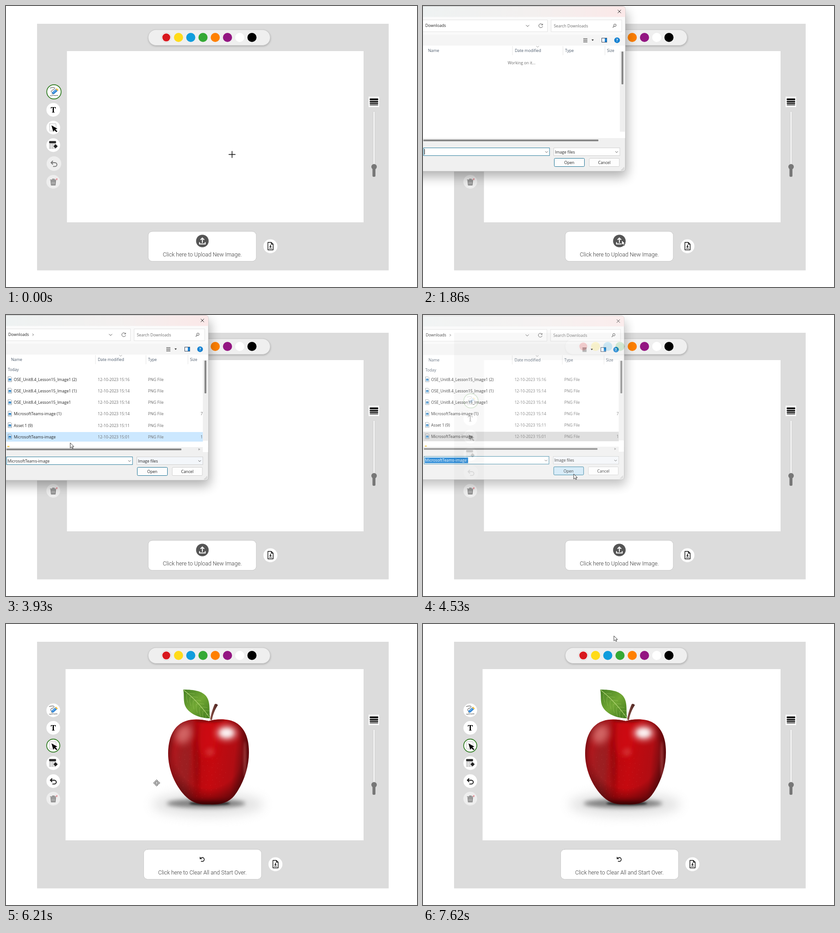
Recreate the animation shown at these times as an HTML page. Size 900 by 617 pixels, loop 7650 ms.

```html
<!DOCTYPE html>
<html lang="en">
<head>
<meta charset="utf-8">
<title>Image annotation board</title>
<style>
  html, body { margin: 0; width: 100%; height: 100%; overflow: hidden; background: #fff; }
  svg { display: block; width: 900px; height: 617px; }
  .ui { font: 8.7px "Open Sans", "Noto Sans", sans-serif; fill: #222; }
  .ui .dim { fill: #6d6d6d; }
  .ui .head { fill: #4c5a6b; }
  .label { font: 300 12.2px Roboto, sans-serif; fill: #333; text-anchor: middle; }
  .glyph { font: bold 17px "Noto Serif", "DejaVu Serif", serif; text-anchor: middle; }
</style>
</head>
<body>
<svg id="stage" viewBox="0 0 900 617" xmlns="http://www.w3.org/2000/svg"></svg>
<script>
const LOOP = 7650;
const svg = document.getElementById('stage');

const rect = (x, y, w, h, fill, more = '') =>
  `<rect x="${x}" y="${y}" width="${w}" height="${h}" fill="${fill}" ${more}/>`;
const disc = (x, y, r, fill, more = '') =>
  `<circle cx="${x}" cy="${y}" r="${r}" fill="${fill}" ${more}/>`;
const oval = (x, y, rx, ry, fill, more = '') =>
  `<ellipse cx="${x}" cy="${y}" rx="${rx}" ry="${ry}" fill="${fill}" ${more}/>`;
const line = (d, color = '#222', w = 1, more = '') =>
  `<path d="${d}" fill="none" stroke="${color}" stroke-width="${w}" ${more}/>`;
const shape = (d, fill, more = '') => `<path d="${d}" fill="${fill}" ${more}/>`;
const text = (x, y, s, cls = '', more = '') => `<text x="${x}" y="${y}" class="${cls}" ${more}>${s}</text>`;
const group = (id, body, more = '') => `<g id="${id}" ${more}>${body}</g>`;
const at = (x, y, body) => `<g transform="translate(${x} ${y})">${body}</g>`;
const gradient = (id, kind, attrs, stops) =>
  `<${kind}Gradient id="${id}" ${attrs}>` +
  stops.map(([o, c, a = 1]) => `<stop offset="${o}" stop-color="${c}" stop-opacity="${a}"/>`).join('') +
  `</${kind}Gradient>`;
const blur = (id, s) =>
  `<filter id="${id}" x="-60%" y="-60%" width="220%" height="220%"><feGaussianBlur stdDeviation="${s}"/></filter>`;

const APPLE = 'M444 213C461 208 488 207 504 217C523 229 532 250 532 282C532 317 519 352 500 377C487 393 468 397 444 396C421 397 405 391 391 376C370 353 355 320 355 284C355 248 369 221 394 213C411 207 430 210 444 213Z';
const LEAF = 'M388 144C405 144 427 145 438 158C449 172 444 190 447 207C426 207 404 199 394 183C387 171 391 157 388 144Z';
const ARROW = 'M0 0V11.2L2.7 8.8L4.6 12.4L6.3 11.6L4.6 8.1H8Z';

const defs = `<defs>
  ${blur('soft2', 2)}${blur('soft5', 5)}${blur('soft8', 8)}${blur('soft12', 12)}
  ${gradient('skin', 'linear', 'x1="0" x2="1" y1="0" y2=".12"',
    [[0, '#84141a'], [.1, '#b3181e'], [.3, '#a8171d'], [.36, '#b5090f'], [.6, '#c5090f'], [.86, '#b10d13'], [1, '#6d0c11']])}
  ${gradient('shade', 'radial', 'cx=".5" cy=".4" r=".62"', [[0, '#400', 0], [.66, '#400', 0], [1, '#2d0306', .68]])}
  ${gradient('leafFill', 'linear', 'x1="0" x2="1" y1="0" y2="1"', [[0, '#467f24'], [.5, '#72a834'], [1, '#3f781d']])}
  ${gradient('stemFill', 'linear', '', [[0, '#8c5248'], [1, '#4a2320']])}
  ${gradient('titleFill', 'linear', '', [[0, '#eef2f2'], [.55, '#f3f0ef'], [1, '#fbe8e8']])}
  <clipPath id="inApple"><path d="${APPLE}"/></clipPath>
  <clipPath id="inLeaf"><path d="${LEAF}"/></clipPath>
  <clipPath id="inList"><rect x="0" y="87" width="431" height="203"/></clipPath>
</defs>`;

function frameParts() {
  const colors = ['#d8171d', '#ffdb1a', '#109ddd', '#35a935', '#ff8000', '#931682', '#fff', '#000'];
  const swatches = colors.map((c, i) => disc(351 + i * 26.8, 69, i ? 10 : 8.7, c)).join('');
  const bars = [[203, 4], [208.5, 3], [212.8, 2.3], [216.4, 1.5]]
    .map(([y, h]) => rect(796.5, y, 18.5, h, '#000', 'rx=".8"')).join('');
  return rect(0, 0, 900, 617, '#fff') + rect(68, 39, 770, 541.5, '#dcdcdc') +
    rect(312, 54, 267, 34, '#777', 'rx="17" opacity=".55" filter="url(#soft2)"') +
    rect(311.5, 52, 267, 34.5, '#efefef', 'rx="17" stroke="#c9c9c9"') +
    disc(351, 69, 10.6, '#fff', 'stroke="#cfcfcf"') + swatches +
    rect(794, 199, 23, 23, '#fff') + bars +
    rect(803.5, 231, 5, 144, '#eee', 'rx="2.5" stroke="#cfcfcf"') +
    rect(802.5, 352, 6.5, 23, '#777', 'rx="2.5"') + disc(806, 353, 6, '#777');
}

const button = (x, y, body, r = 15, fill = '#fff') => at(x, y, disc(0, 0, r, fill) + body);
const ring = r => disc(0, 0, r, 'none', 'stroke="#2d7a1f" stroke-width="1.7"');

const penIcon =
  line('M-9-8C-5-10 2-10 2-8C2-5-6-4-6-1C-6 2-2 0-4 4', '#333', 1) +
  line('M-9 8C-6 10-2 7 1 8S5 7 9 8', '#444', 1) +
  shape('M-5 6L-4 1L4-6L8-2L0 5Z', '#2f83d3') + line('M-2 2L5-4', '#7fc0f5', 1.3) +
  shape('M4-6L6-8L10-4L8-2Z', '#f5bd3d') + shape('M-5 6L-4 3L-2 5Z', '#f1c58d');
const textIcon = text(0, 6, 'T', 'glyph');
const selectIcon = rect(-8, -8.5, 14, 16, 'none', 'stroke="#888" stroke-width=".9" stroke-dasharray="1.4 1"') +
  shape('M-4-5L9 2.5L4.3 3.8L9 8L7 10L2.4 5.5L0 9Z', '#000');
const tableIcon = rect(-9, -9, 15, 5, '#292929', 'rx="1"') + rect(-9, -3, 15, 11, '#c8c8c8', 'rx="1"') +
  line('M-9 .5H6M-9 4H6M-4-3V8M1-3V8', '#f3f3f3', 1) + shape('M5-2.5L10 2.5L5 7.5L0 2.5Z', '#222', 'stroke="#fff" stroke-width=".6"');
const undoIcon = c => line('M-6.2-2H2.3A4.2 4.2 0 0 1 2.3 6.4H-2M-2.3-6L-6.3-2L-2.3 2', c, 1.9);
const trashIcon = shape('M-6-3H6L5 8H-5Z', '#858585') + line('M-7-4.3H7M-2.5-6H3', '#858585', 1.6) +
  line('M-2.8-1V6M0-1V6M2.8-1V6', '#e3e3e3', 1) + line('M5.8-7.5L9.3-4M9.3-7.5L5.8-4', '#e68c94', 1.1);
const fileIcon = line('M-5.5-8.5H2L6-4.5V8H-5.5ZM2-8.5V-4.5H6', '#111', 1.4, 'stroke-linejoin="round"') +
  shape('M-.8-3H1V.5H3L.1 3.4L-2.8.5H-.8Z', '#222') + line('M-3 4.8H3.5', '#222', 1);

const toolbar = (pen, select, undo, trash) => pen +
  button(103.5, 228, textIcon) + select + button(103.5, 305.5, tableIcon) + undo + trash;

const dropZone = (x, w) =>
  rect(x + .5, 495, w, 65.5, '#fff', 'rx="9" stroke="#aaa" stroke-dasharray="1.5 1.5"');

function emptyBoard() {
  return rect(133.5, 99, 649.5, 376, '#fff') +
    toolbar(button(105, 188.5, penIcon + ring(15.7), 16), button(103.5, 267, selectIcon),
      button(105, 346, undoIcon('#777'), 16, '#eee'), button(103.5, 386, trashIcon, 15, '#eee')) +
    dropZone(311, 236.5) + disc(430, 516, 13.8, '#555') +
    line('M430 520V510M426 513.5L430 509.5L434 513.5M423.8 518.5V522.5H436.2V518.5', '#fff', 2) +
    text(430, 550, 'Click here to Upload New Image.', 'label') + button(579, 527.5, fileIcon, 15.3);
}

function apple() {
  let veins = '';
  for (let i = 1; i < 8; i++) {
    const x = 389 + i * 7, y = 146 + i * 7.5;
    veins += `M${x} ${y}q9-2 17 0M${x} ${y}q-2 10 2 19`;
  }
  let specks = '';
  for (let i = 0; i < 90; i++) {
    const a = i * 2.4, r = Math.sqrt(i / 90);
    specks += disc((423 + 58 * r * Math.cos(a)).toFixed(1), (328 + 55 * r * Math.sin(a)).toFixed(1), .5, '#e07b72', 'opacity=".38"');
  }
  return oval(442, 396, 122, 26, '#bbb', 'opacity=".42" filter="url(#soft12)"') +
    oval(438, 394, 86, 10, '#444', 'opacity=".6" filter="url(#soft5)"') +
    oval(446, 394, 45, 4, '#000', 'opacity=".75" filter="url(#soft2)"') +
    shape(APPLE, 'url(#skin)') +
    `<g clip-path="url(#inApple)">` +
      oval(392, 335, 21, 78, '#8f2528', 'opacity=".48" filter="url(#soft8)"') +
      oval(418, 295, 4, 78, '#68080d', 'opacity=".45" filter="url(#soft5)"') +
      oval(440, 250, 20, 46, '#d90c12', 'opacity=".5" filter="url(#soft8)"') +
      shape(APPLE, 'url(#shade)') + specks +
      oval(446, 212, 32, 4, '#6c0a0c', 'opacity=".7" filter="url(#soft2)"') +
      oval(389, 242, 17, 22, '#f0a49f', 'opacity=".55" filter="url(#soft8)" transform="rotate(28 389 242)"') +
      oval(483, 239, 21, 14, '#fff', 'opacity=".85" filter="url(#soft8)"') +
      oval(483, 239, 13, 8, '#fff', 'opacity=".75" filter="url(#soft5)"') +
      oval(447, 281, 10, 9, '#df6865', 'opacity=".35" filter="url(#soft5)"') +
      oval(523, 299, 3, 42, '#e9847e', 'opacity=".35" filter="url(#soft2)"') +
      oval(445, 397, 60, 8, '#220205', 'opacity=".65" filter="url(#soft5)"') +
    `</g>` +
    shape('M447 210C449 197 453 185 457 176Q461 174 464 178C457 189 453 199 451 211Z', 'url(#stemFill)') +
    shape(LEAF, 'url(#leafFill)') +
    `<g clip-path="url(#inLeaf)">` + line(veins, '#a4cd62', .7, 'opacity=".7"') + `</g>` +
    line('M389 145Q419 168 447 207', '#b5d878', 1.1);
}

function filledBoard() {
  return rect(130.5, 99, 652.5, 376, '#fff') + apple() +
    toolbar(button(103.5, 189.5, penIcon), button(103.5, 267, selectIcon + ring(14.4)),
      button(103.5, 345, undoIcon('#111')), button(103.5, 383.5, trashIcon, 15, '#eee')) +
    dropZone(301, 258) +
    line('M425.8 515A4.4 4.4 0 1 1 427 520.5M425 511.5V515.5H429', '#222', 1.6) +
    text(430, 550, 'Click here to Clear All and Start Over.', 'label') + button(590, 527.5, fileIcon, 15.3);
}

const files = [
  ['OSE_Unit8.4_Lesson15_Image1 (2)', '15:16'], ['OSE_Unit8.4_Lesson15_Image1 (1)', '15:14'],
  ['OSE_Unit8.4_Lesson15_Image1', '15:14'], ['MicrosoftTeams-image (1)', '15:14', '7'],
  ['Asset 1 (9)', '15:11'], ['MicrosoftTeams-image', '15:01', '1,1'],
];

function fileRow([name, time, size = ''], i) {
  const y = 141.5 + i * 25.2;
  return line(`M4.5 ${y - 6}h6l2 2v9h-8Z`, '#8a949c', .9) + rect(5.8, y - 2, 5.3, 5, '#2779bd') +
    shape(`M6 ${y + 2.5}l2-2.5 3 2.5Z`, '#8fd0f5') +
    text(17, y + 3.2, name) + text(201, y + 3.2, '12-10-2023 ' + time, 'dim') +
    text(311, y + 3.2, 'PNG File', 'dim') + text(426, y + 3.2, size, 'dim');
}

const chevron = (x, y, w = 3.5) => line(`M${x - w} ${y - w / 2}l${w} ${w}l${w}-${w}`, '#555', 1);

function dialog() {
  const headings = [[11, 'Name'], [201, 'Date modified'], [311, 'Type'], [403, 'Size']]
    .map(([x, s]) => text(x, 101, s, 'head')).join('');
  const shadow = rect(-40, 12, 487, 363, '#000', 'rx="8" opacity=".3" filter="url(#soft12)"');
  const chrome = rect(-20, .5, 463, 362.5, '#f0f0f0', 'rx="6" stroke="#b3b3b3" stroke-width=".8"') +
    shape('M0 1H437Q443 1 443 7V24H0Z', 'url(#titleFill)') +
    line('M426.5 8.5l7 7m0-7l-7 7', '#222', 1) +
    rect(0, 24, 442.6, 39, '#fafafa') + rect(0, 63, 442.6, 24, '#f5f5f5') +
    rect(-5, 30.5, 277.5, 26, '#fff', 'stroke="#e2e2e2"') + rect(280.5, 30.5, 154.5, 26, '#fff', 'stroke="#e2e2e2"') +
    text(5, 46.3, 'Downloads') + chevron(229, 43.5) +
    line('M261.5 41A4.3 4.3 0 1 0 262 44.5M262 39V41.7H259', '#555', 1) +
    text(286.5, 46.8, 'Search Downloads', 'dim') +
    disc(420.3, 42.3, 2.6, 'none', 'stroke="#444"') + line('M418.4 44.3L415.5 47.3', '#444', 1.1) +
    line('M351 71.5h9m-9 2.6h9m-9 2.6h9m-9 2.6h9', '#444', 1) + shape('M369 73.5h5l-2.5 3Z', '#222') +
    rect(391.5, 70.5, 11, 9, '#fff', 'stroke="#33455c"') + rect(398, 71, 4.5, 8, '#1a83d6') +
    disc(425, 75.2, 6.2, '#1582d2') + text(425, 78.4, '?', '', 'style="fill:#fff;text-anchor:middle;font-weight:bold"');
  const list = rect(0, 87, 442.6, 203, '#fff') + rect(431, 99, 11.5, 177, '#efefef') +
    rect(434.7, 100, 4, 72, '#858585', 'rx="1"') +
    line('M196 88V108M306.5 88V108M398.5 88V108', '#e5e5e5') + line('M248 88l3 2.5l3-2.5', '#888', .8) + headings +
    group('working', text(185.5, 128.3, 'Working on it...', 'dim')) +
    group('loaded',
      line('M58 41l2.3 2.3l-2.3 2.3', '#444', .9) + text(4, 123.3, 'Today', 'head') +
      group('row', rect(0, 257, 431, 21, '#cce8ff')) +
      `<g clip-path="url(#inList)">${files.map(fileRow).join('')}</g>` +
      rect(3, 287.5, 4.5, 2.5, '#f2c94c') + rect(431, 289, 11.5, 12, '#fff') + shape('M421.5 292.5v5l4-2.5Z', '#aaa'));
  const footer = rect(1, 293.2, 383, 3.8, '#858585', 'rx="1"') +
    rect(1.5, 311.5, 275.5, 17, '#fff', 'stroke="#2d7f9f"') +
    group('caret', line('M3.5 314V326', '#111')) +
    group('chosen', rect(3, 314, 95.5, 12.5, '#0a78d0', 'id="marked"') + text(3.5, 323.5, 'MicrosoftTeams-image', '', 'id="chosenName"')) +
    chevron(270.5, 320.5, 2.8) +
    rect(286.5, 311.5, 144.5, 17, '#fff', 'id="kind" stroke="#d0d0d0"') + text(289, 323.5, 'Image files') + chevron(424, 320.5, 2.8) +
    rect(287.5, 334.5, 66, 18, '#fdfdfd', 'id="open" rx="2" stroke="#1e7496"') +
    text(320.3, 347, 'Open', '', 'text-anchor="middle"') +
    rect(364, 334.5, 66, 18, '#fdfdfd', 'rx="2" stroke="#d0d0d0"') + text(397, 347, 'Cancel', '', 'text-anchor="middle"') +
    line('M434 361l7-7m-4 7l4-4', '#aaa', 1.2, 'stroke-dasharray="1.4 1"');
  return shadow + chrome + list + footer;
}

const moveCursor = shape('M0-7L2.8-4H1.1V-1.1H4V-2.8L7 0L4 2.8V1.1H1.1V4H2.8L0 7L-2.8 4H-1.1V1.1H-4V2.8L-7 0L-4-2.8V-1.1H-1.1V-4H-2.8Z',
  '#fff', 'stroke="#222" stroke-width=".9"');

svg.innerHTML = defs + frameParts() + group('empty', emptyBoard()) + group('filled', filledBoard()) +
  group('dialog', dialog(), 'class="ui"') +
  group('pointer', group('cross', line('M-7.5 0H7.5M0-7.5V7.5', '#111', 1.5)) +
    group('move', moveCursor) + group('arrow', shape(ARROW, '#fff', 'stroke="#222" stroke-width=".9"')));

const el = Object.fromEntries([...svg.querySelectorAll('[id]')].map(n => [n.id, n]));
const show = (node, on) => node.setAttribute('display', on ? 'inline' : 'none');
const clamp = v => Math.max(0, Math.min(1, v));
const smooth = v => v * v * (3 - 2 * v);

// Pointer stops: time, x, y
const path = [
  [0, 495, 326], [250, 495, 326], [1050, 435, 514], [2350, 435, 514], [3080, 255, 277], [3260, 255, 277],
  [3560, 105, 268], [3800, 105, 268], [4320, 330, 349], [6700, 330, 349], [7400, 418, 26], [LOOP, 418, 26],
];

function pointerAt(t) {
  const i = Math.max(1, path.findIndex(p => p[0] > t));
  const [t0, x0, y0] = path[i - 1], [t1, x1, y1] = path[i];
  const k = smooth((t - t0) / (t1 - t0));
  return [x0 + (x1 - x0) * k, y0 + (y1 - y0) * k];
}

function draw(t) {
  const opened = t >= 1650 && t < 4670;
  const filled = t >= 4860;
  const picked = t >= 3680, pressed = t >= 4410;
  show(el.empty, !filled);
  show(el.filled, filled);

  const shown = Math.min(clamp((t - 1650) / 150), 1 - clamp((t - 4500) / 160));
  const scale = .96 + .04 * shown;
  show(el.dialog, opened);
  el.dialog.setAttribute('opacity', shown);
  el.dialog.setAttribute('transform', `translate(${125 * (1 - scale)} ${178 * (1 - scale)}) scale(${scale})`);
  show(el.working, t < 2500);
  show(el.loaded, t >= 2500);
  show(el.row, picked);
  el.row.firstChild.setAttribute('fill', pressed ? '#d9d9d9' : '#cce8ff');
  show(el.chosen, picked);
  show(el.caret, !picked);
  show(el.marked, pressed);
  el.chosenName.style.fill = pressed ? '#fff' : '#222';
  el.open.setAttribute('fill', t >= 4220 ? '#cfe8f7' : '#fdfdfd');
  el.kind.setAttribute('fill', t >= 2500 ? '#f3f6fa' : '#fff');

  const [x, y] = pointerAt(t);
  const onBoard = x > 131 && x < 783 && y > 99 && y < 475 && !opened;
  el.pointer.setAttribute('transform', `translate(${x} ${y})`);
  show(el.cross, onBoard && !filled);
  show(el.move, onBoard && filled);
  show(el.arrow, !onBoard);
}

function tick() {
  draw(performance.now() % LOOP);
  requestAnimationFrame(tick);
}
tick();
</script>
</body>
</html>
```
